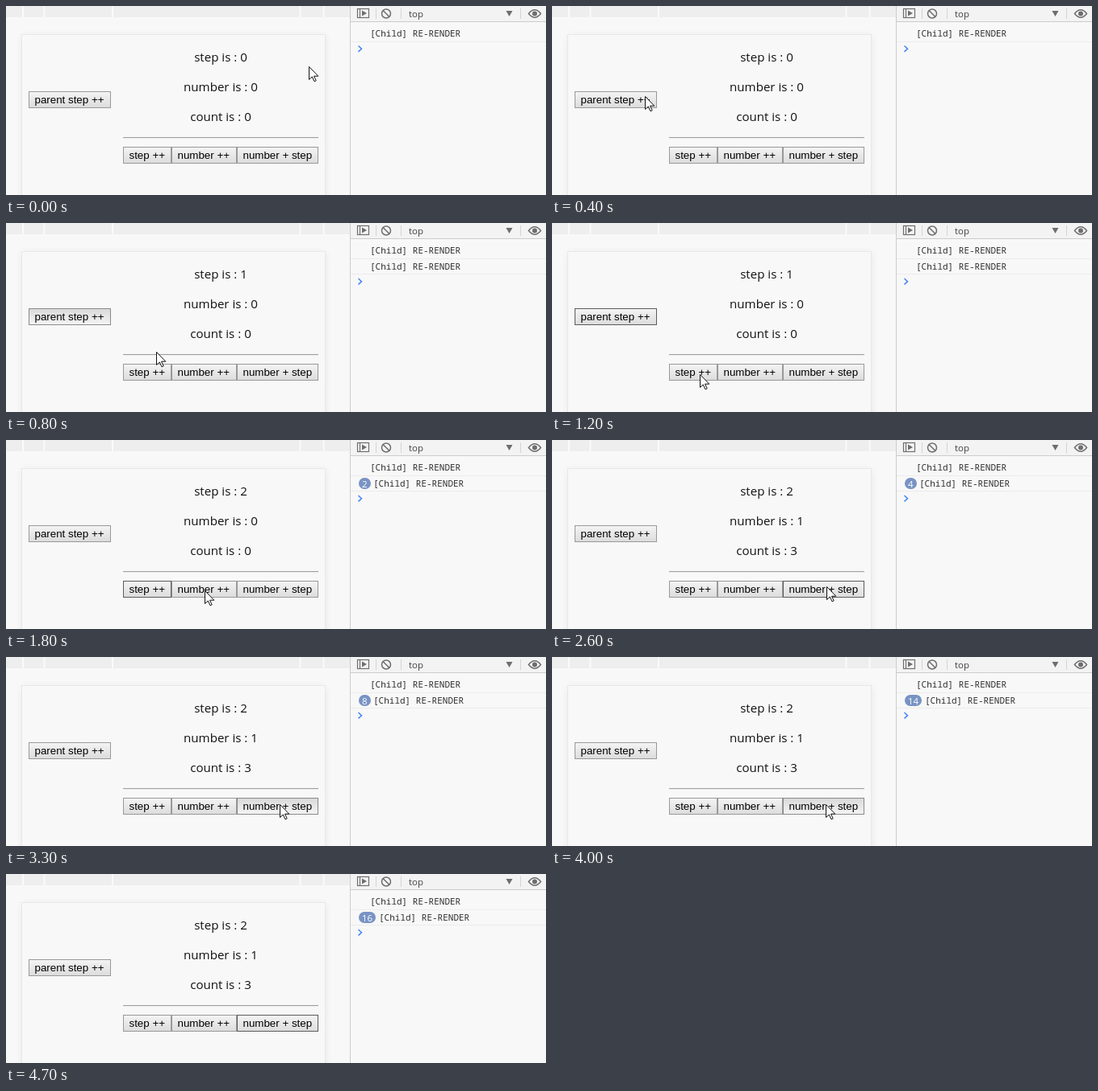
An HTML page that plays this animation: 669 px wide and 235 px high, repeating every 4.9 s.

```html
<!DOCTYPE html>
<html lang="en">
<head>
<meta charset="utf-8">
<title>Child re-render counter</title>
<style>
  html, body { margin: 0; width: 100%; height: 100%; overflow: hidden; background: #f8f8f8; }
  svg { display: block; width: 669px; height: 235px; }
  text { white-space: pre; }
  .label { font: 15.1px "Open Sans", "Noto Sans", sans-serif; text-anchor: middle; fill: #111; }
  .btn text { font: 13.333px "Liberation Sans", Arial, sans-serif; fill: #000; }
  .btn rect { fill: url(#up); stroke: #999; }
  .btn.focus rect { stroke: #5c5c5c; }
  .btn.down rect { fill: url(#down); stroke: #8a8a8a; }
  .log { font: 11px "Noto Sans Mono", "DejaVu Sans Mono", monospace; fill: #303030; }
  .ui { font: 11.5px "Open Sans", "Noto Sans", sans-serif; fill: #444; }
  .icon { fill: none; stroke: #6e6e6e; stroke-width: 1.5; }
  .solid { fill: #6e6e6e; }
</style>
</head>
<body>
<svg viewBox="0 0 669 235">
  <defs>
    <linearGradient id="up" x2="0" y2="1"><stop stop-color="#f4f4f4"/><stop offset="1" stop-color="#dcdcdc"/></linearGradient>
    <linearGradient id="down" x2="0" y2="1"><stop stop-color="#d9d9d9"/><stop offset="1" stop-color="#f4f4f4"/></linearGradient>
    <filter id="soft" x="-10%" y="-10%" width="120%" height="120%"><feGaussianBlur stdDeviation="5"/></filter>
  </defs>

  <rect width="669" height="235" fill="#f8f8f8"/>

  <!-- page -->
  <rect x="20" y="37" width="376" height="230" fill="#000" opacity=".07" filter="url(#soft)"/>
  <rect x="19.5" y="35.5" width="376" height="230" fill="#f8f8f8" stroke="#e8e8e8"/>
  <rect width="426" height="14" fill="#eee"/>
  <path d="M21 0v14M47.500 0v14M132 0v14M364.500 0v14M393.500 0v14" stroke="#fafafa" stroke-width="2"/>
  <text class="label" id="step" x="266" y="69"></text>
  <text class="label" id="number" x="266" y="106"></text>
  <text class="label" id="count" x="266" y="143"></text>
  <path d="M145 163.500H387" stroke="#a0a0a0"/>
  <path d="M145 164.500H387" stroke="#ececec"/>
  <g id="buttons"></g>

  <!-- console -->
  <rect x="427" width="242" height="19" fill="#f3f3f3"/>
  <path d="M426.500 0V235M427 19.500H669" stroke="#ccc"/>
  <rect class="icon" x="435.500" y="3.500" width="14" height="11" style="stroke-width:1.2"/>
  <path class="icon" d="M438.500 3.500v11" style="stroke-width:1.2"/>
  <path class="solid" d="M441 5.500l6 3.500-6 3.500z"/>
  <path d="M458.500 3v13M489.500 3v13M637.500 3v13" stroke="#d4d4d4"/>
  <circle class="icon" cx="471" cy="9.500" r="5.500"/>
  <path class="icon" d="M467.200 5.700l7.600 7.600"/>
  <text class="ui" x="499" y="13.500">top</text>
  <path class="solid" d="M619.500 6h8l-4 7z"/>
  <path class="icon" d="M647.500 9.500Q655 0 662.500 9.500Q655 19 647.500 9.500z"/>
  <circle class="solid" cx="655" cy="9.500" r="3"/>
  <path d="M427 44.500H669" stroke="#ececec"/>
  <text class="log" x="451" y="38">[Child] RE-RENDER</text>
  <g id="second">
    <path d="M427 63.500H669" stroke="#ececec"/>
    <text class="log" id="line" y="58">[Child] RE-RENDER</text>
  </g>
  <g id="badge">
    <rect x="437" y="47" height="14" rx="7" fill="#7893c4"/>
    <text class="ui" x="441" y="58.700" style="fill:#fff"></text>
  </g>
  <path id="prompt" d="M436.500 49.500l4 3.700-4 3.700" fill="none" stroke="#4285f4" stroke-width="1.500"/>

  <path id="cursor" d="M.5 .5V16.500L4.300 13l2.700 5.800 2.200-1L6.500 12.200H11.800z" fill="#fff" stroke="#111"/>
</svg>
<script>
const LOOP = 4900;
const $ = id => document.getElementById(id);

// Each entry changes only the listed values; logs counts console messages.
const steps = [
  [0, { x: 375, y: 75, step: 0, number: 0, count: 0, logs: 1, focus: '', down: '' }],
  [100, { x: 350, y: 79 }],
  [200, { x: 265, y: 92 }],
  [300, { x: 170, y: 105 }],
  [400, { x: 115, y: 112 }],
  [500, { x: 99, y: 113 }],
  [700, { focus: 'parent', down: 'parent', step: 1, logs: 2 }],
  [800, { x: 186, y: 160 }],
  [900, { x: 187, y: 172, down: '' }],
  [1000, { x: 186, y: 181 }],
  [1100, { x: 184, y: 186 }],
  [1200, { x: 183, y: 188 }],
  [1300, { focus: 'step', down: 'step' }],
  [1400, { step: 2, logs: 3 }],
  [1500, { x: 186, down: '' }],
  [1600, { x: 210 }],
  [1700, { x: 237 }],
  [1800, { x: 246, y: 187 }],
  [1900, { focus: 'number', down: 'number' }],
  [2000, { x: 254, number: 1, count: 3, logs: 4, down: '' }],
  [2100, { x: 305, y: 184 }],
  [2200, { x: 340, y: 182 }],
  [2400, { focus: 'sum', down: 'sum' }],
  [2500, { logs: 5 }],
  [2600, { down: '' }],
  [2800, { x: 339, y: 183, down: 'sum', logs: 6 }],
  [3000, { logs: 7 }],
  [3100, { logs: 8, down: '' }],
  [3200, { down: 'sum' }],
  [3300, { logs: 9 }],
  [3400, { logs: 10 }],
  [3500, { logs: 11 }],
  [3700, { logs: 12 }],
  [3800, { logs: 13 }],
  [3900, { logs: 14 }],
  [4000, { logs: 15 }],
  [4200, { logs: 16, down: '' }],
  [4300, { logs: 17 }],
  [4400, { x: 372, y: 172 }],
  [4500, { x: 505, y: 122 }],
  [4600, { x: 630, y: 62 }],
  [4700, { x: 690, y: 40 }]
];

const buttons = {};
function addButton(name, label, x, y, w) {
  $('buttons').insertAdjacentHTML('beforeend',
    `<g class="btn"><rect x="${x + .5}" y="${y + .5}" width="${w - 1}" height="20"/>` +
    `<text x="${x + 7.5}" y="${y + 15}">${label}</text></g>`);
  buttons[name] = $('buttons').lastElementChild;
}
addButton('parent', 'parent step ++', 28, 106, 102);
addButton('step', 'step ++', 145, 175, 60);
addButton('number', 'number ++', 205, 175, 81);
addButton('sum', 'number + step', 286, 175, 101);

let state = {};
const states = steps.map(([at, change]) => ({ at, ...(state = { ...state, ...change }) }));
const [badgeBox, badgeText] = $('badge').children;
const show = (el, on) => el.setAttribute('visibility', on ? 'visible' : 'hidden');

function draw(s) {
  for (const key of ['step', 'number', 'count']) $(key).textContent = `${key} is : ${s[key]}`;
  for (const name in buttons) {
    buttons[name].classList.toggle('focus', s.focus === name);
    buttons[name].classList.toggle('down', s.down === name);
  }
  const repeats = s.logs - 1;
  const wide = repeats > 9;
  show($('second'), repeats > 0);
  show($('badge'), repeats > 1);
  badgeText.textContent = repeats;
  badgeBox.setAttribute('width', wide ? 21 : 15);
  $('line').setAttribute('x', repeats < 2 ? 451 : wide ? 462 : 455);
  $('prompt').setAttribute('transform', `translate(0 ${repeats > 0 ? 19.5 : 0})`);
  $('cursor').setAttribute('transform', `translate(${s.x} ${s.y})`);
}

const start = performance.now();
let shown;
function tick() {
  const t = (performance.now() - start) % LOOP;
  const now = states.findLast(s => s.at <= t);
  if (now !== shown) draw(shown = now);
  requestAnimationFrame(tick);
}
tick();
</script>
</body>
</html>
```
